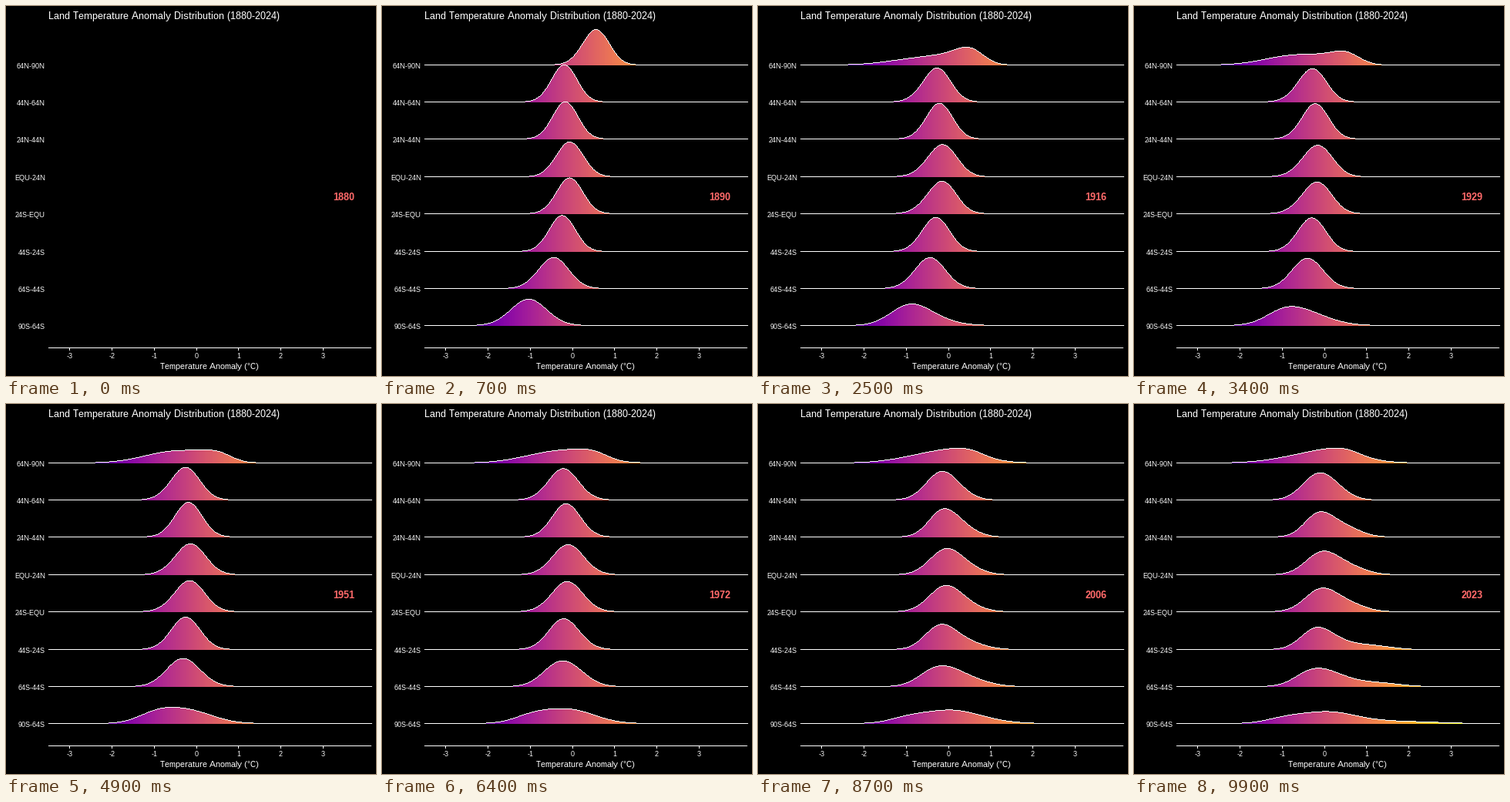
A matplotlib script for the animation above (10000 ms loop, 480x480 px).

```python
import numpy as np
import matplotlib.pyplot as plt
from matplotlib.animation import FuncAnimation

SIZE, DPI = 480, 96
FRAMES, INTERVAL = 100, 100
FIRST, LAST = 1880, 2023
COLDEST, TURN = 1912, 1955
LEFT, RIGHT, AXIS_Y = 55, 475, 443
ZERO, UNIT = 246.6, 54.67      # pixel of 0 degrees, pixels per degree
HEIGHT = 14.52                 # peak height in pixels of a bell with sd 1

plt.rcParams.update({
    "font.family": "Liberation Sans",
    "text.hinting": "default",
    "text.hinting_factor": 1,
    "text.kerning_factor": 6,
})

# Mean in 1880, at the coldest point, at the turn; later warming; spread.
ZONES = {
    "64N-90N": (.62, -1.1, .1, .45, .30),
    "44N-64N": (-.18, -.42, -.07, .4, .30),
    "24N-44N": (-.16, -.29, -.02, .85, .30),
    "EQU-24N": (-.05, -.29, .02, .85, .32),
    "24S-EQU": (-.05, -.33, 0, .85, .31),
    "44S-24S": (-.23, -.40, 0, 1.6, .31),
    "64S-44S": (-.44, -.42, .1, 1.7, .36),
    "90S-64S": (-1.05, -.40, .2, 2.6, .42),
}

cols = np.arange(LEFT, RIGHT)
rows = np.arange(SIZE)[:, None]
years = np.arange(FIRST, LAST + 1)[:, None]
temps = (cols + .5 - ZERO) / UNIT
fill = (plt.cm.plasma((temps + 3.4) / 6.6)[:, :3] * 255).astype(np.uint8)
fill = np.broadcast_to(fill, (SIZE, len(cols), 3))


def progress(start, end):
    return np.clip((years - start) / (end - start), 0, 1)


def running_density(early, cold, turn, warming, spread):
    """Average of one bell per year, for every year so far."""
    cooling = progress(FIRST, COLDEST) ** 2
    mean = (early + (cold - early) * cooling
            + (turn - cold) * progress(COLDEST, TURN)
            + warming * progress(TURN, LAST) ** (.5 + warming))
    sd = spread + .2 * abs(cold - early) * cooling
    bells = HEIGHT / sd * np.exp(-((temps - mean) / sd) ** 2 / 2)
    return np.cumsum(bells, axis=0) / (years - FIRST + 1)


def baseline(i):
    return int(76.27 + 48.35 * i)


densities = [running_density(*zone) for zone in ZONES.values()]

blank = np.zeros((SIZE, SIZE, 3), np.uint8)
blank[AXIS_Y, LEFT:RIGHT - 1] = 255
ticks = {v: int(247 + UNIT * v) for v in range(-3, 4)}
for px in ticks.values():
    blank[AXIS_Y:AXIS_Y + 4, px] = 255


def draw_ridge(img, base, height):
    panel = img[:, LEFT:RIGHT]
    top = base - np.rint(height).astype(int)
    prev = np.r_[top[0], top[:-1]]
    inside = (rows > top) & (rows <= base)
    panel[inside] = fill[inside]
    edge = (rows >= np.minimum(top, prev + 1)) & (rows <= np.maximum(top, prev - 1))
    panel[edge] = 255


fig = plt.figure(figsize=(SIZE / DPI, SIZE / DPI), dpi=DPI, facecolor="black")
ax = fig.add_axes([0, 0, 1, 1])
ax.set_axis_off()
picture = ax.imshow(blank, extent=(0, SIZE, SIZE, 0), interpolation="none", aspect="auto")


def label(x, y, text, px, ha="center", color="white", **kw):
    return ax.text(x, y, text, fontsize=px * 72 / DPI, ha=ha, va="baseline",
                   color=color, **kw)


label(LEFT, 17, "Land Temperature Anomaly Distribution (1880-2024)", 13, "left")
label(264, 471, "Temperature Anomaly (°C)", 11)
for value, px in ticks.items():
    label(px + .5, 457, str(value), 9)
for i, name in enumerate(ZONES):
    label(51, baseline(i) + 5, name, 9, "right")
year_text = label(438.5, 252, "", 13, color="#ff6a6a", weight="bold")


def update(frame):
    year = round(FIRST + frame * (LAST - FIRST) / (FRAMES - 1))
    img = blank.copy()
    if year - FIRST >= 2:
        for i, density in enumerate(densities):
            draw_ridge(img, baseline(i), density[year - FIRST])
    picture.set_data(img)
    year_text.set_text(str(year))
    return picture, year_text


anim = FuncAnimation(fig, update, frames=FRAMES, interval=INTERVAL,
                     init_func=lambda: update(0), repeat=True, repeat_delay=0)
plt.show()
```
